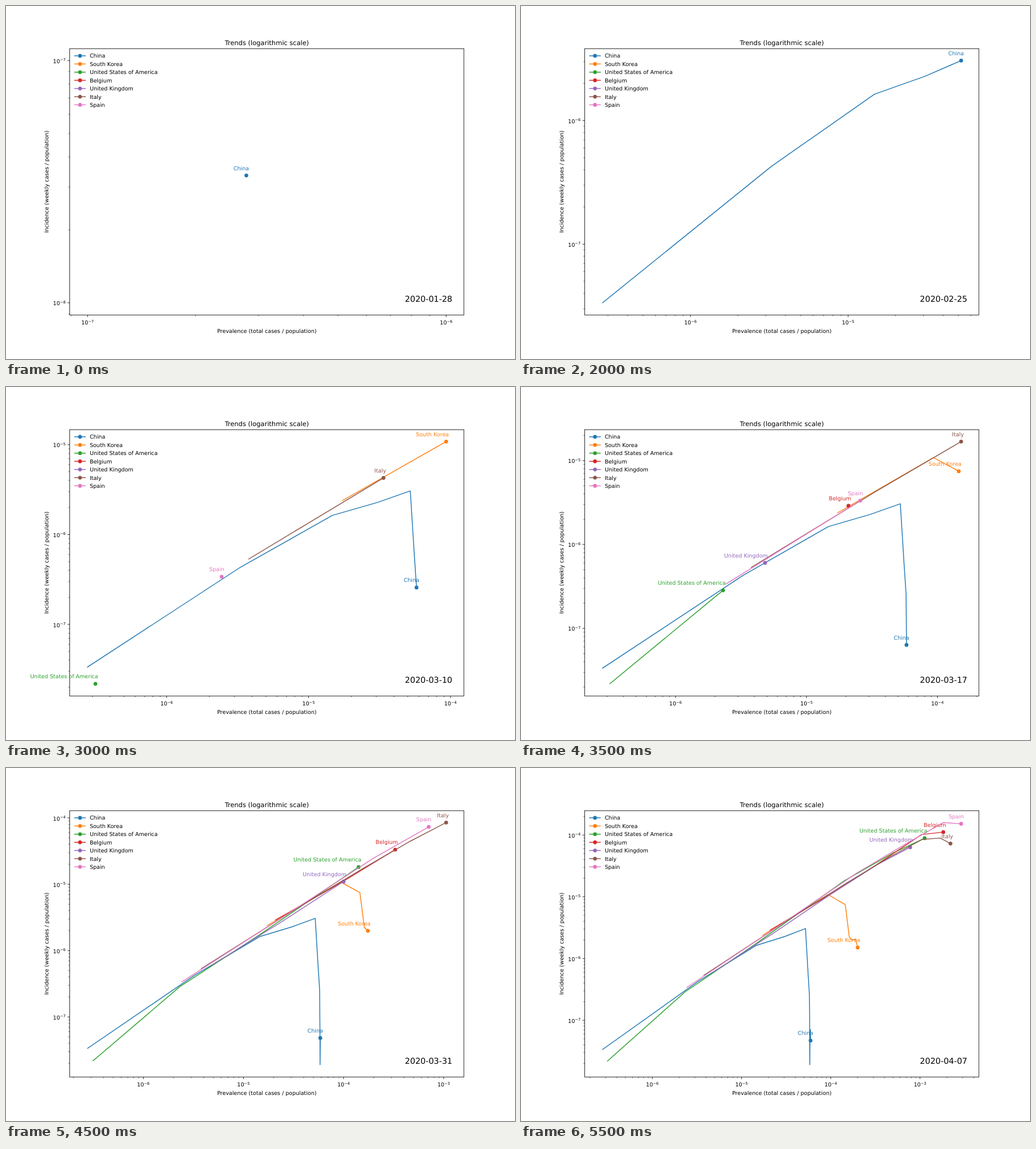
Recreate the animation shown at these times as an HTML page. Size 899x623 px, loop 7.5 s.

```html
<!DOCTYPE html>
<html lang="en">
<head>
<meta charset="utf-8">
<title>Trends</title>
<style>
  html, body { margin: 0; width: 100%; height: 100%; overflow: hidden; background: #fff; }
  svg { display: block; width: 899px; height: 623px; }
  text { font-family: "DejaVu Sans", sans-serif; font-size: 9.605px; text-rendering: geometricPrecision; white-space: pre; }
</style>
</head>
<body>
<svg id="stage" viewBox="0 0 899 623" xmlns="http://www.w3.org/2000/svg"></svg>
<script>
const LOOP = 7500, STEP = 500, LAST_STEP = 11;
const UNIT = 0.9605; // pixels per point
const AXES = { left: 112.5, right: 808.8, top: 75.3, bottom: 545.3 };
const PLOT = { left: 144.05, right: 777.4, top: 96.3, bottom: 523.8 };

// totals: the week before the first plotted one, then one value per week
const COUNTRIES = [
  { name: 'China', color: '#1f77b4', people: 1392.7e6, from: 0,
    totals: [59, 386, 4537, 20471, 42708, 72528, 77754, 80261, 80880, 81065, 81535, 82225, 82682] },
  { name: 'South Korea', color: '#ff7f0e', people: 51.64e6, from: 5,
    totals: [31, 893, 4812, 7513, 8320, 9037, 9786, 10331] },
  { name: 'United States of America', color: '#2ca02c', people: 327.17e6, from: 6,
    totals: [53, 103, 754, 4661, 46208, 164620, 368196] },
  { name: 'Belgium', color: '#d62728', people: 11.42e6, from: 7,
    totals: [8, 239, 1085, 3743, 11899, 20814] },
  { name: 'United Kingdom', color: '#9467bd', people: 66.49e6, from: 7,
    totals: [40, 321, 1543, 6650, 22141, 51608] },
  { name: 'Italy', color: '#8c564b', people: 60.43e6, from: 5,
    totals: [3, 229, 2036, 9172, 27980, 63927, 101739, 132547] },
  { name: 'Spain', color: '#e377c2', people: 46.72e6, from: 6,
    totals: [3, 114, 1204, 9191, 33089, 85195, 135032] },
];

// Points are [log10 prevalence, log10 mean daily incidence]
for (const c of COUNTRIES) {
  c.points = c.totals.slice(1).map((total, i) => [
    Math.log10(total / c.people),
    Math.log10((total - c.totals[i]) / 7 / c.people),
  ]);
}

const stage = document.getElementById('stage');

function add(parent, tag, attrs = {}, content = '') {
  const node = document.createElementNS('http://www.w3.org/2000/svg', tag);
  for (const key in attrs) node.setAttribute(key, attrs[key]);
  node.textContent = content;
  return parent.appendChild(node);
}

const segment = (parent, x1, y1, x2, y2, stroke, width) =>
  add(parent, 'line', { x1, y1, x2, y2, stroke, 'stroke-width': width });

const marker = (parent, cx, cy, fill) =>
  add(parent, 'circle', { cx, cy, r: 3.5 * UNIT, fill });

function powerLabel(parent, x, y, exponent, anchor) {
  const label = add(parent, 'text', { x, y, 'text-anchor': anchor }, '10');
  add(label, 'tspan', { dy: -3.65, style: 'font-size:6.72px' }, '\u2212' + Math.abs(exponent));
}

const curves = add(stage, 'g');
const ticks = add(stage, 'g');
const frame = add(stage, 'g');
const labels = add(stage, 'g');

add(frame, 'rect', {
  x: AXES.left, y: AXES.top, width: AXES.right - AXES.left, height: AXES.bottom - AXES.top,
  fill: 'none', stroke: '#000', 'stroke-width': 0.85,
});
const middle = { 'text-anchor': 'middle' };
add(frame, 'text', { x: 460.7, y: 69, style: 'font-size:11.53px', ...middle }, 'Trends (logarithmic scale)');
add(frame, 'text', { x: 460.7, y: 576.8, ...middle }, 'Prevalence (total cases / population)');
add(frame, 'text', { transform: 'translate(74.9 310) rotate(-90)', ...middle }, 'Incidence (weekly cases / population)');
const date = add(frame, 'text', { x: 788.3, y: 521.8, 'text-anchor': 'end', style: 'font-size:14.41px' });

COUNTRIES.forEach((c, i) => {
  const y = 87.9 + i * 14.42;
  segment(frame, 120.4, y, 140.9, y, c.color, 1.5 * UNIT);
  marker(frame, 130.7, y, c.color);
  add(frame, 'text', { x: 147.9, y: y + 3.5 }, c.name);
});

// Linear map from the value range to the inner plot; a lone value spans its decade
function makeScale(values, start, end) {
  let low = Math.min(...values), high = Math.max(...values);
  if (low === high) [low, high] = [Math.floor(low), Math.ceil(high)];
  return v => start + (v - low) / (high - low) * (end - start);
}

function drawTicks(scale, low, high, draw) {
  for (let exponent = -9; exponent < 0; exponent++) {
    for (let digit = 1; digit < 10; digit++) {
      const at = scale(exponent + Math.log10(digit));
      if (at >= low && at <= high) draw(at, digit === 1, exponent);
    }
  }
}

const tickLength = major => (major ? 3.5 : 2) * UNIT + 0.4;
const tickWidth = major => (major ? 0.85 : 0.6);

function draw(step) {
  for (const group of [curves, ticks, labels]) group.replaceChildren();

  const active = COUNTRIES.filter(c => c.from <= step)
    .map(c => ({ ...c, points: c.points.slice(0, step - c.from + 1) }));
  const all = active.flatMap(c => c.points);
  const sx = makeScale(all.map(p => p[0]), PLOT.left, PLOT.right);
  const sy = makeScale(all.map(p => p[1]), PLOT.bottom, PLOT.top);

  for (const c of active) {
    const path = c.points.map(([px, py]) => [sx(px), sy(py)]);
    const [x, y] = path[path.length - 1];
    if (path.length > 1) {
      add(curves, 'polyline', {
        points: path.join(' '), fill: 'none', stroke: c.color,
        'stroke-width': 1.5 * UNIT, 'stroke-linejoin': 'round', 'stroke-linecap': 'square',
      });
    }
    marker(curves, x, y, c.color);
    add(labels, 'text', {
      x: x + 5 * UNIT, y: y - 10 * UNIT, fill: c.color, 'text-anchor': 'end',
    }, c.name);
  }

  drawTicks(sx, AXES.left, AXES.right, (x, major, exponent) => {
    segment(ticks, x, AXES.bottom, x, AXES.bottom + tickLength(major), '#000', tickWidth(major));
    if (major) powerLabel(ticks, x, 562.4, exponent, 'middle');
  });
  drawTicks(sy, AXES.top, AXES.bottom, (y, major, exponent) => {
    segment(ticks, AXES.left - tickLength(major), y, AXES.left, y, '#000', tickWidth(major));
    if (major) powerLabel(ticks, 105.2, y + 4.5, exponent, 'end');
  });

  const day = new Date(Date.UTC(2020, 0, 28 + 7 * Math.min(step, 10)));
  date.textContent = day.toISOString().slice(0, 10);
}

let shown = -1;
const begin = performance.now();

function update(now) {
  const time = Math.max(0, now - begin) % LOOP;
  const step = Math.min(LAST_STEP, Math.floor(time / STEP));
  if (step !== shown) draw(shown = step);
  requestAnimationFrame(update);
}
update(begin);
</script>
</body>
</html>
```
